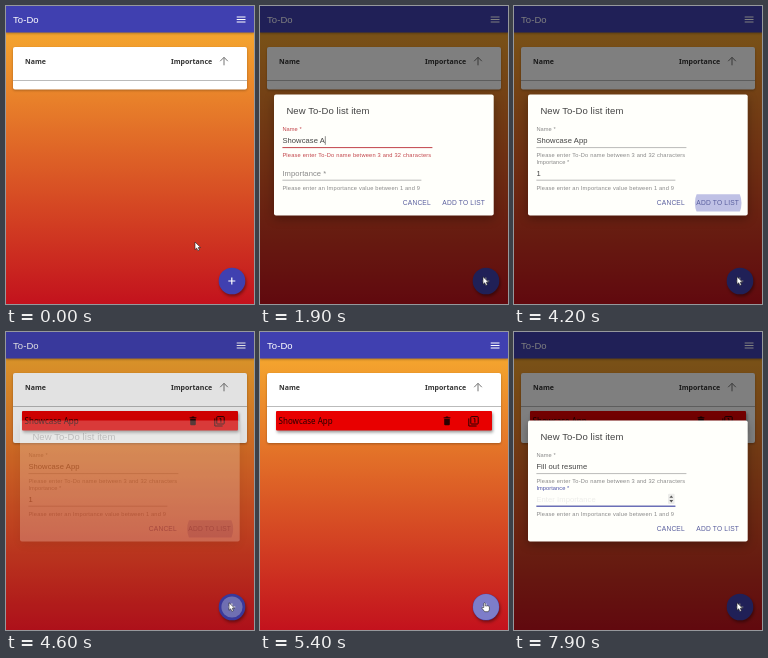
An HTML page for the animation above (8000 ms loop, 248 px wide and 298 px high).

```html
<!DOCTYPE html>
<html lang="en">
<head>
<meta charset="utf-8">
<title>To-Do</title>
<style>
  html, body { margin: 0; width: 100%; height: 100%; overflow: hidden; }
  svg { display: block; width: 100vw; height: 100vh; }
  text { font-family: "Liberation Sans", Arial, sans-serif; white-space: pre; }
  .h6 { font-size: 9.5px; letter-spacing: .0075em; }
  .head { font: 600 7px "Noto Sans", "Open Sans", sans-serif; fill: #333; }
  .row { font: 8px "Noto Sans", "Open Sans", sans-serif; fill: #2a0000; }
  .body { font-size: 7.6px; letter-spacing: .00938em; }
  .small { font-size: 5.7px; letter-spacing: .03333em; }
  .label { letter-spacing: .00938em; }
  .button { font-size: 6.65px; letter-spacing: .02857em; fill: #5a5f9e; }
  .hint { fill: #a6a6a6; }
  .low { filter: drop-shadow(0 1px 1px rgba(0,0,0,.28)); }
  .mid { filter: drop-shadow(1px 2px 1.5px rgba(0,0,0,.4)); }
  .high { filter: drop-shadow(0 3px 5px rgba(0,0,0,.3)); }
</style>
</head>
<body>
<svg viewBox="0 0 248 298" preserveAspectRatio="none">
  <defs>
    <linearGradient id="sky" x2="0" y2="1">
      <stop stop-color="#f9b330"/>
      <stop offset="1" stop-color="#c3121d"/>
    </linearGradient>
    <clipPath id="addClip"><rect x="179" y="188.3" width="51" height="17.2" rx="2"/></clipPath>
  </defs>

  <rect width="248" height="298" fill="url(#sky)"/>
  <rect class="low" width="248" height="26.5" fill="#4040b0"/>
  <text class="h6" x="7" y="16.8" fill="#fff">To-Do</text>
  <path d="M230.7 11h8.8M230.7 13.5h8.8M230.7 16h8.8" stroke="#fff" stroke-width="1.1"/>

  <rect id="card" class="low" x="7" y="41" width="234" height="42.5" rx="2" fill="#fff"/>
  <text class="head" x="19" y="58">Name</text>
  <text class="head" x="165" y="58">Importance</text>
  <path d="M218 59.3v-8M214.2 55.2l3.8-3.9 3.8 3.9" fill="none" stroke="#757575"/>
  <path d="M7 74.5h234" stroke="#aaa" stroke-width=".8"/>

  <g id="item">
    <rect class="mid" x="16" y="79" width="216" height="19.6" rx="1" fill="#e80000"/>
    <text class="row" x="18.6" y="91.8">Showcase App</text>
    <path d="M183.6 85.2h1.8l.6-.7h2l.6.7h1.8v1h-6.8zM184.2 86.8h5.6v5.4q0 1-1 1h-3.6q-1 0-1-1z" fill="#2a0000"/>
    <g fill="none" stroke="#2a0000">
      <rect x="210.8" y="84.6" width="7.4" height="7.4" rx=".6"/>
      <path d="M208.8 86.4v7.6h7.8M213.6 86.6h1.3v4"/>
    </g>
  </g>

  <circle class="mid" cx="226" cy="275" r="13.3" fill="#4040b0"/>
  <circle id="fabPulse" cx="226" cy="275" fill="#fff" fill-opacity=".32"/>
  <path d="M222.3 275h7M225.8 271.5v7" stroke="#fff" stroke-width="1.2"/>

  <rect id="backdrop" width="248" height="298"/>

  <g id="dialog">
    <rect class="high" x="14" y="88.4" width="219.7" height="121.2" rx="2" fill="#fffffb"/>
    <text class="h6" x="26.4" y="107.6" fill="#444">New To-Do list item</text>

    <text id="nameLabel" class="small label" x="22.4" y="124.6">Name *</text>
    <text id="nameHint" class="body hint" x="22.4" y="137.4">Enter Item Name</text>
    <text id="nameValue" class="body" x="22.4" y="137.4" fill="#444"></text>
    <path id="nameLine" d="M22.4 141.6h150"/>
    <text id="nameHelp" class="small" x="22.4" y="151.2">Please enter To-Do name between 3 and 32 characters</text>

    <text id="rankLabel" class="label" x="22.4">Importance *</text>
    <text id="rankHint" class="body hint" x="22.4" y="169.6">Enter Importance</text>
    <text id="rankValue" class="body" x="22.4" y="169.6" fill="#444"></text>
    <path d="M22.4 174.2h139" stroke="#8c8c8c" stroke-width=".6"/>
    <path id="rankLine" stroke="#3f45b0" stroke-width="1"/>
    <g id="spinner">
      <rect x="154" y="161.8" width="6.6" height="10.2" rx="1" fill="#ececea"/>
      <path d="M155.4 165.8l1.9-2.4 1.9 2.4zM155.4 168l1.9 2.4 1.9-2.4z" fill="#555"/>
    </g>
    <text class="small" x="22.4" y="183.6" fill="#888">Please enter an Importance value between 1 and 9</text>

    <path id="caret" stroke="#444" stroke-width=".6"/>
    <circle id="addPulse" cx="204.2" cy="197" fill="#3f45b5" fill-opacity=".33" clip-path="url(#addClip)"/>
    <text class="button" x="142.8" y="199.2">CANCEL</text>
    <text class="button" x="182.3" y="199.2">ADD TO LIST</text>
  </g>

  <g id="pointer" fill="#fff" stroke="#222" stroke-width=".6" stroke-linejoin="round">
    <path id="arrow" d="M0 0v7.6l1.7-1.5 1.2 2.6 1.5-.7-1.2-2.5h2.4z"/>
    <path id="hand" d="M.8 4.8V.6q.8-1 1.5 0v2.6q.8-.7 1.4.1.8-.6 1.4.2.9-.4 1.3.4v3.2L5.3 9H1.7L-1 5.6q-.2-1 .7-.9z"/>
  </g>
</svg>
<script>
const LOOP = 8000;
const BLUE = '#4a50a8', RED = '#c2444a', GREY = '#888';
const el = Object.fromEntries([...document.querySelectorAll('[id]')].map(n => [n.id, n]));

const clamp = x => Math.min(1, Math.max(0, x));
const ramp = (t, start, length) => clamp((t - start) / length);
const ease = x => x * x * (3 - 2 * x);
const within = (t, a, b) => t >= a && t < b;
const mix = (a, b, k) => a + (b - a) * k;
const show = (node, on) => node.setAttribute('visibility', on ? 'inherit' : 'hidden');
const set = (node, attrs) => {
  for (const key in attrs) node.setAttribute(key, attrs[key]);
};

// Each visit to the dialog, in ms.
const VISITS = [
  { open: 750, type: 1000, text: 'Showcase App', tab: 2350, digit: 2850, submit: 2950, close: 4450, error: [1090, 2000] },
  { open: 5480, type: 6030, text: 'Fill out resume', tab: 7600, digit: 9e9, submit: 9e9, close: 9e9, error: [0, 0] }
];
const KEY = 90;

function drawDialog(t) {
  const visit = t < 5000 ? VISITS[0] : VISITS[1];
  const opacity = ease(ramp(t, visit.open, 225)) * (1 - ramp(t, visit.close, 195));
  el.dialog.setAttribute('opacity', opacity);
  el.backdrop.setAttribute('opacity', opacity * .5);
  show(el.dialog, opacity > 0);

  const typed = visit.text.slice(0, Math.max(0, Math.floor((t - visit.type) / KEY)));
  const onName = t < visit.tab;
  const onRank = within(t, visit.tab, visit.submit);
  const error = within(t, ...visit.error);
  el.nameValue.textContent = typed;
  show(el.nameHint, !typed);
  el.nameLabel.setAttribute('fill', error ? RED : onName ? BLUE : GREY);
  el.nameHelp.setAttribute('fill', error ? RED : GREY);
  set(el.nameLine, { stroke: error ? RED : '#8c8c8c', 'stroke-width': error ? 1 : .6 });
  show(el.caret, onName && typed);
  if (typed) {
    el.caret.setAttribute('d', `M${22.8 + el.nameValue.getComputedTextLength()} 130.2v8.6`);
  }

  const float = ease(ramp(t, visit.tab, 200));
  const digit = t >= visit.digit ? '1' : '';
  set(el.rankLabel, {
    y: mix(169.6, 157.6, float),
    'font-size': mix(7.6, 5.7, float),
    fill: onRank ? BLUE : GREY
  });
  el.rankValue.textContent = digit;
  el.rankHint.setAttribute('opacity', digit ? 0 : .3 * ramp(t, visit.tab + 100, 300));
  const half = 69.5 * float;
  el.rankLine.setAttribute('d', `M${91.9 - half} 174.2h${2 * half}`);
  show(el.rankLine, onRank);
  show(el.spinner, onRank);

  show(el.addPulse, t >= visit.submit);
  el.addPulse.setAttribute('r', 22.6 - .7 * Math.cos((t - visit.submit) / 2500 * 2 * Math.PI));
}

function drawPage(t) {
  const added = t >= 4400;
  el.card.setAttribute('height', added ? 70 : 42.5);
  show(el.item, added);

  const focused = within(t, 4450, 5600);
  const pressed = within(t, 660, 950);
  const grow = focused ? mix(10.6, 13, ease(ramp(t, 4600, 600))) : mix(3, 13, ramp(t, 660, 290));
  show(el.fabPulse, focused || pressed);
  el.fabPulse.setAttribute('r', grow);

  const move = ease(ramp(t, 50, 550));
  el.pointer.setAttribute('transform', `translate(${mix(189, 223, move)} ${mix(236, 270.7, move)})`);
  const hand = within(t, 500, 800) || within(t, 4700, 5560);
  show(el.hand, hand);
  show(el.arrow, !hand);
}

const start = performance.now();
function tick() {
  const t = (performance.now() - start) % LOOP;
  drawPage(t);
  drawDialog(t);
  requestAnimationFrame(tick);
}
tick();
</script>
</body>
</html>
```
